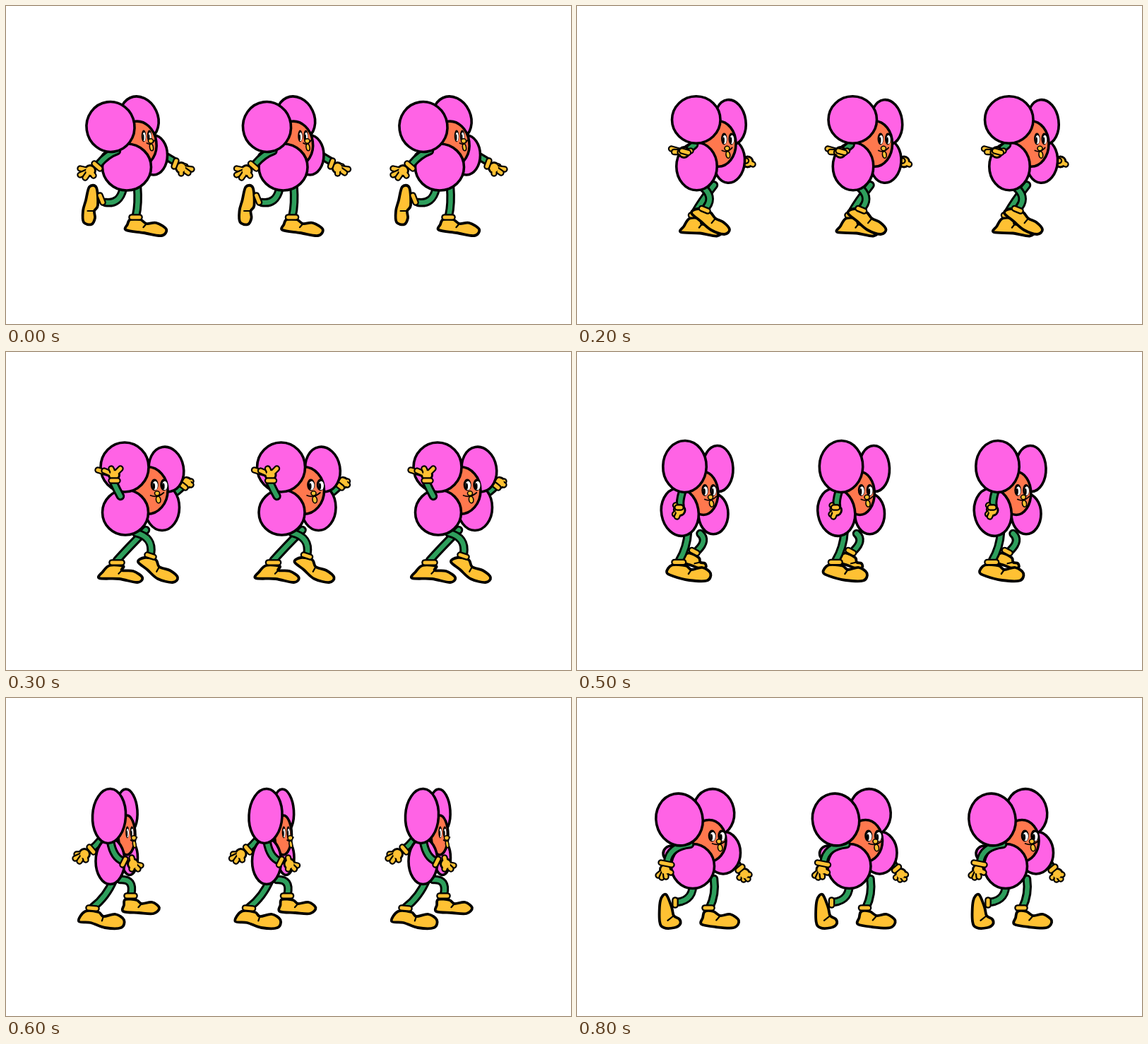
Animation, 800 px wide and 450 px high, one loop 0.9 s. Source, as an HTML page with a canvas:

```html
<!DOCTYPE html>
<html lang="en">
<head>
<meta charset="utf-8">
<title>Walking flowers</title>
<style>
html, body { margin: 0; width: 100%; height: 100%; overflow: hidden; background: #fff; }
canvas { display: block; }
</style>
</head>
<body>
<canvas id="stage" width="800" height="450"></canvas>
<script>
const ctx = document.getElementById('stage').getContext('2d');
const PINK = '#ff63e5', ORANGE = '#ff784e', YELLOW = '#ffc133', GREEN = '#2e9f5c', INK = '#000';
const STEP = 100, STEPS = 9, SPACING = 221.5;

// petals, disc: x, y, rx, ry, degrees      face: eyes x, y, width factor, nose x, y
// limb: start, control, end                cuff: two ends
// hand: palm, four finger tips             shoe: outline from front of ankle round to its back
const poses = [];
poses[0] = {
  topLeft: [148, 171, 34, 35.5, -8], topRight: [189, 159, 26, 32, -25],
  lowLeft: [171, 228, 34.5, 33, 0], lowRight: [209, 211, 19.5, 28, 0], behind: [148, 214, 12, 8, 0],
  disc: [187, 195, 26, 32, -8], face: [199, 184, .5, 205, 191],
  nearArm: { limb: [157, 205, 143, 210, 132, 223], cuff: [125, 223, 133, 230],
    hand: [119, 233, 105, 230, 105, 239, 112, 243, 124, 240] },
  farArm: { limb: [222, 210, 232, 216, 237, 219], cuff: [241, 219, 238, 227],
    hand: [248, 229, 254, 227, 263, 231, 258, 236, 248, 237] },
  farLeg: { limb: [186, 255, 188, 280, 184, 297], cuff: [178, 299, 189, 299],
    shoe: [190, 302, 199, 308, 213, 307, 227, 316, 220, 325, 195, 321, 170, 317, 172, 309, 176, 302] },
  nearLeg: { limb: [166, 258, 161, 281, 141, 278], cuff: [133, 268, 137, 278],
    shoe: [130, 282, 125, 290, 126, 300, 121, 309, 110, 306, 109, 290, 113, 275, 118, 256, 128, 257] }
};
poses[1] = {
  topLeft: [169.5, 159, 34.5, 31.5, 0], topRight: [207, 163, 19.5, 32, -5],
  lowLeft: [170, 227, 25, 35.5, 0], lowRight: [210, 219, 19.5, 29, 8],
  disc: [200, 194, 21, 31, 0], face: [210, 188, .45, 211, 203],
  nearArm: { limb: [170, 189, 163, 208, 158, 227], cuff: [148, 228, 157, 233],
    hand: [150, 240, 137, 237, 136, 245, 143, 249, 160, 245] },
  farArm: { limb: [215, 234, 220, 240, 221, 246], cuff: [217, 248, 225, 246],
    hand: [227, 256, 219, 259, 224, 263, 230, 263, 236, 260] },
  farLeg: { limb: [190, 255, 180, 275, 176, 292], cuff: [173, 294, 182, 295],
    shoe: [184, 299, 190, 308, 205, 308, 218, 316, 210, 325, 188, 322, 162, 320, 166, 312, 172, 299] },
  nearLeg: { limb: [170, 255, 180, 277, 162, 283], cuff: [153, 286, 161, 290],
    shoe: [164, 289, 175, 297, 184, 304, 189, 314, 181, 320, 165, 313, 150, 301, 137, 289, 146, 283] }
};
poses[3] = {
  topLeft: [168, 163, 34, 35, 0], topRight: [227, 166, 24.5, 32, -10],
  lowLeft: [169, 227, 32.5, 32, 0], lowRight: [221, 220, 24.5, 32.5, 0],
  disc: [200, 196, 29, 33.5, 0], face: [217, 188, .85, 214, 200], armOnTop: true,
  nearArm: { limb: [162, 204, 157, 195, 152, 184], cuff: [149, 182, 158, 182],
    hand: [153, 174, 130, 167, 139, 168, 149, 165, 162, 165] },
  farArm: { limb: [232, 204, 243, 198, 251, 189], cuff: [249, 188, 254, 192],
    hand: [256, 185, 250, 182, 255, 181, 262, 183, 262, 188] },
  farLeg: { limb: [198, 252, 172, 278, 157, 295], cuff: [150, 298, 164, 298],
    shoe: [166, 303, 164, 309, 180, 310, 193, 319, 186, 326, 160, 321, 132, 320, 137, 311, 147, 302] },
  nearLeg: { limb: [184, 256, 209, 262, 205, 286], cuff: [200, 287, 209, 290],
    shoe: [212, 294, 217, 304, 232, 309, 243, 319, 236, 326, 215, 321, 200, 308, 187, 297, 196, 291] }
};
poses[4] = {
  topLeft: [159, 157, 38, 34.5, 0], topRight: [227.5, 170, 28.5, 34, 0],
  lowLeft: [144, 222, 32, 35.5, -20], lowRight: [211, 232, 30.5, 33, 0],
  disc: [187, 206, 29.5, 33, 0], face: [199, 201, 1.08, 197, 213],
  nearArm: { limb: [150, 193, 138, 197, 127, 205], cuff: [119, 204, 125, 212],
    hand: [111, 213, 101, 208, 90, 209, 90, 217, 105, 224] },
  farArm: { limb: [238, 213, 249, 220, 256, 228], cuff: [252, 232, 261, 226],
    hand: [260, 237, 250, 243, 256, 248, 263, 248, 268, 242] },
  farLeg: { limb: [187, 257, 188, 277, 165, 283], cuff: [154, 281, 158, 289],
    shoe: [160, 296, 157, 304, 155, 309, 148, 312, 141, 308, 136, 300, 132, 292, 136, 284, 150, 284] },
  nearLeg: { limb: [161, 254, 170, 270, 167, 294], cuff: [159, 298, 173, 297],
    shoe: [177, 302, 186, 307, 200, 304, 211, 312, 205, 322, 178, 321, 151, 316, 151, 307, 157, 301] }
};
poses[6] = {
  topLeft: [146, 167, 23.5, 38.5, 3], topRight: [171.5, 160, 14.5, 31, -4],
  lowLeft: [147.5, 231, 20.5, 32.5, 0], lowRight: [175, 226, 11.5, 24.5, 0],
  disc: [171, 194, 12, 28, 0], face: [175, 190, .4, 181, 198],
  nearArm: { limb: [148, 203, 152, 226, 166, 231], cuff: [165, 236, 169, 228],
    hand: [180, 235, 178, 226, 191, 237, 187, 242, 178, 242] },
  farArm: { limb: [133, 202, 128, 208, 122, 213], cuff: [118, 211, 124, 218],
    hand: [111, 221, 100, 221, 98, 227, 104, 231, 113, 229] },
  farLeg: { limb: [162, 257, 182, 256, 177, 278], cuff: [171, 280, 182, 280],
    shoe: [185, 286, 192, 291, 207, 289, 217, 297, 209, 305, 188, 304, 166, 302, 167, 293, 169, 285] },
  nearLeg: { limb: [153, 256, 142, 282, 123, 296], cuff: [117, 297, 128, 298],
    shoe: [131, 303, 138, 309, 155, 306, 167, 314, 163, 325, 140, 325, 120, 318, 103, 316, 112, 302] }
};
poses[8] = {
  topLeft: [145, 172, 33, 37, -12], topRight: [193.5, 162, 29, 33.5, -12],
  lowLeft: [164, 238, 30.5, 31.5, 0], lowRight: [207, 219, 24.5, 30, 0], behind: [134, 220, 12, 11, 0],
  disc: [187, 202, 24, 29.5, 0], face: [198, 195, .85, 201, 203],
  nearArm: { limb: [160, 207, 131, 210, 128, 232], cuff: [119, 233, 134, 236],
    hand: [125, 243, 115, 251, 120, 254, 126, 253, 133, 247] },
  farArm: { limb: [225, 233, 228, 237, 230, 241], cuff: [228, 244, 234, 239],
    hand: [237, 249, 230, 254, 236, 257, 242, 256, 244, 250] },
  farLeg: { limb: [194, 256, 197, 278, 188, 296], cuff: [181, 297, 191, 297],
    shoe: [193, 302, 203, 308, 217, 306, 229, 315, 222, 325, 196, 324, 176, 320, 178, 311, 181, 302] },
  nearLeg: { limb: [164, 260, 166, 286, 142, 289], cuff: [139, 286, 139, 293],
    shoe: [134, 296, 137, 308, 145, 313, 146, 320, 138, 325, 123, 325, 117, 316, 118, 287, 126, 278] }
};

// Halfway pose: every number is the mean of its two neighbours.
function halfway(a, b) {
  if (typeof a === 'number') return (a + b) / 2;
  if (Array.isArray(a)) return a.map((value, i) => halfway(value, b[i]));
  return Object.fromEntries(Object.keys(a).map(key => [key, halfway(a[key], b[key])]));
}
for (const i of [2, 5, 7]) poses[i] = halfway(poses[i - 1], poses[i + 1]);

function stroke(path, color, width) {
  ctx.strokeStyle = color;
  ctx.lineWidth = width;
  ctx.stroke(path);
}

function oval([x, y, rx, ry, angle = 0], color, line = 3.6) {
  const path = new Path2D();
  path.ellipse(x, y, rx, ry, angle * Math.PI / 180, 0, Math.PI * 2);
  ctx.fillStyle = color;
  ctx.fill(path);
  if (line) stroke(path, INK, line);
}

function tube([x0, y0, ...rest], color, width, line = 3) {
  const path = new Path2D();
  path.moveTo(x0, y0);
  if (rest.length === 4) path.quadraticCurveTo(...rest);
  else path.lineTo(...rest);
  stroke(path, INK, width + line * 2);
  stroke(path, color, width);
}

// Closed Catmull-Rom curve through the points.
function blob(flat, color) {
  const n = flat.length / 2;
  const at = i => { const k = (i + n) % n * 2; return [flat[k], flat[k + 1]]; };
  const path = new Path2D();
  path.moveTo(...at(0));
  for (let i = 0; i < n; i++) {
    const [a, b, c, d] = [at(i - 1), at(i), at(i + 1), at(i + 2)];
    path.bezierCurveTo(b[0] + (c[0] - a[0]) / 6, b[1] + (c[1] - a[1]) / 6,
      c[0] - (d[0] - b[0]) / 6, c[1] - (d[1] - b[1]) / 6, ...c);
  }
  ctx.fillStyle = color;
  ctx.fill(path);
  stroke(path, INK, 3.8);
}

function drawHand({ cuff, hand: [x, y, ...tips] }) {
  oval([x, y, 7, 7], YELLOW, 4);
  for (let i = 0; i < tips.length; i += 2) tube([x, y, tips[i], tips[i + 1]], YELLOW, 5, 2.2);
  oval([x, y, 6, 6], YELLOW, 0);
  tube(cuff, YELLOW, 5, 2.2);
}

function drawLeg({ limb, cuff, shoe }) {
  tube(limb, GREEN, 6.5);
  blob(shoe, YELLOW);
  const [dipX, dipY] = shoe.slice(2, 4), [archX, archY] = shoe.slice(10, 12);
  const crease = new Path2D();
  crease.moveTo(dipX, dipY);
  crease.lineTo(dipX + (archX - dipX) * .4 - 3, dipY + (archY - dipY) * .4);
  stroke(crease, INK, 2.2);
  tube(cuff, YELLOW, 5, 2.3);
}

function drawFace([x, y, s, noseX, noseY]) {
  for (const side of [-1, 1]) {
    const eyeX = x + side * 8 * s;
    oval([eyeX, y, 6.5 * s, 8.5], INK, 0);
    oval([eyeX + 1.2 * s, y + 1, 4.3 * s, 6.3], '#fff', 0);
    oval([eyeX - 1.2 * s, y + 2, 2.2 * s, 4.5], INK, 0);
  }
  oval([noseX + 2 * s, noseY + 9, 1.5 + 2 * s, 4.8, -10], YELLOW, 1.6);
  const mouth = new Path2D();
  mouth.moveTo(noseX - 11 * s, noseY + 3);
  mouth.quadraticCurveTo(noseX + s, noseY + 7, noseX + 11 * s, noseY - 1);
  stroke(mouth, INK, 1.8);
  oval([noseX, noseY, 3.5, 3.2], YELLOW, 1.6);
}

function drawFlower(pose) {
  const { nearArm, farArm } = pose;
  const drawNearArm = () => tube(nearArm.limb, GREEN, 6.5);
  tube(farArm.limb, GREEN, 6);
  drawHand(farArm);
  drawLeg(pose.farLeg);
  drawLeg(pose.nearLeg);
  if (pose.behind) oval(pose.behind, PINK);
  oval(pose.lowRight, PINK);
  oval(pose.topRight, PINK);
  oval(pose.disc, ORANGE);
  drawFace(pose.face);
  oval(pose.lowLeft, PINK);
  if (!pose.armOnTop) drawNearArm();
  oval(pose.topLeft, PINK);
  if (pose.armOnTop) drawNearArm();
  drawHand(nearArm);
}

function render(time) {
  const pose = poses[Math.floor(time / STEP) % STEPS];
  ctx.fillStyle = '#fff';
  ctx.fillRect(0, 0, 800, 450);
  ctx.lineCap = ctx.lineJoin = 'round';
  for (let i = 0; i < 3; i++) {
    ctx.save();
    ctx.translate(i * SPACING, 0);
    drawFlower(pose);
    ctx.restore();
  }
}

const start = performance.now();
function tick() {
  render(performance.now() - start);
  requestAnimationFrame(tick);
}
tick();
</script>
</body>
</html>
```
